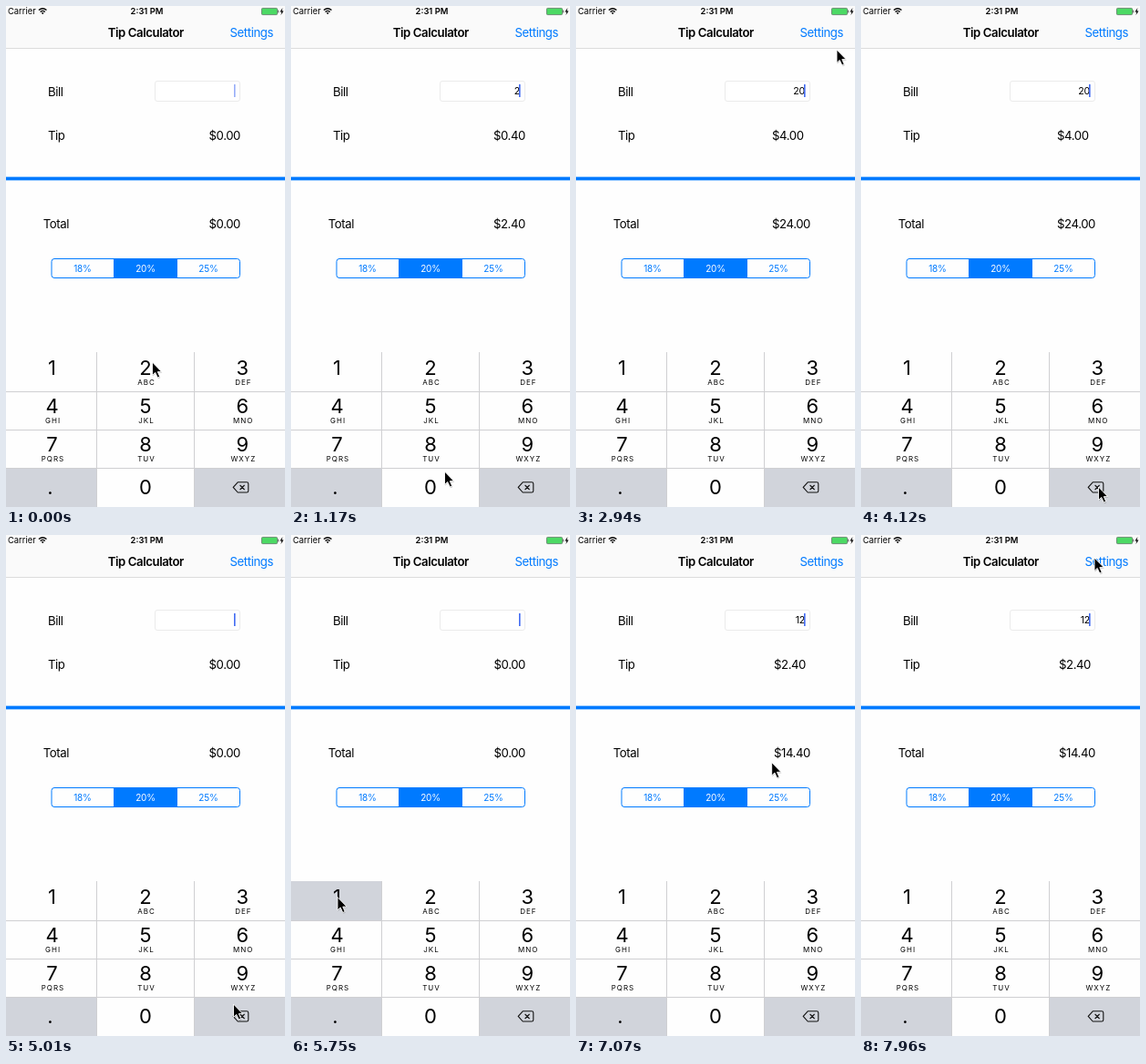
An HTML page for the animation above (8 s loop, 306 by 550 pixels).

```html
<!DOCTYPE html>
<html lang="en">
<head>
<meta charset="utf-8">
<title>Tip Calculator</title>
<style>
  html, body { margin: 0; width: 100%; height: 100%; overflow: hidden; background: #fefefe; }
  svg { display: block; width: 100vw; height: 100vh; }
  text { font-family: Inter, Roboto, sans-serif; fill: #000; white-space: pre; }
  .body { font-size: 13.2px; letter-spacing: -.42px; }
  .bold { font-weight: 600; }
  .link { fill: #007aff; }
  .status { font-size: 9.4px; }
  .seg { font-size: 10px; letter-spacing: -.2px; text-anchor: middle; fill: #007aff; }
  .on { fill: #fff; }
  .field { font-size: 10.6px; letter-spacing: -.3px; }
  .digit { font-size: 22px; text-anchor: middle; }
  .sub { font-size: 8px; letter-spacing: 1px; text-anchor: middle; }
  .mid { text-anchor: middle; }
  .end { text-anchor: end; }
</style>
</head>
<body>
<svg viewBox="0 0 306 550" preserveAspectRatio="none">
  <rect width="306" height="550" fill="#fefefe"/>
  <rect width="306" height="46" fill="#fafafa"/>
  <rect y="46" width="306" height="1" fill="#dcdcdc"/>

  <text class="status" x="2" y="9">Carrier</text>
  <g fill="none" stroke="#000" stroke-width="1.3">
    <path d="M35.9 4.6Q40.2 .9 44.5 4.6M37.6 6.5Q40.2 4.2 42.8 6.5"/>
    <path d="M38.8 7.6Q40.2 6.4 41.6 7.6L40.2 9.2Z" fill="#000" stroke="none"/>
  </g>
  <text class="status bold mid" x="154.5" y="9">2:31 PM</text>
  <rect x="280.4" y="2.4" width="17.2" height="7.2" rx="1.2" fill="#4cd964" stroke="#52665a" stroke-width=".7"/>
  <path d="M298.4 4.6h.5q.7 1.4 0 2.8h-.5z" fill="#333"/>
  <path d="M303.4 2l-3 4.5h1.9l-.8 3.5 3-4.6h-1.9z"/>

  <text class="body bold mid" x="153.3" y="34.3">Tip Calculator</text>
  <text class="body link end" x="293" y="34.3">Settings</text>

  <text class="body" x="46" y="98.6">Bill</text>
  <text class="body" x="46" y="147">Tip</text>
  <text class="body" x="40.8" y="243.8">Total</text>
  <rect x="163.5" y="82.5" width="93" height="22" rx="2.5" fill="#fff" stroke="#ebebeb"/>
  <text class="field end" id="bill" x="250.8" y="97.2"></text>
  <rect id="caret" x="250" y="86" width="1.6" height="14" fill="#426bf2"/>
  <text class="body" id="tip" y="147.4"></text>
  <text class="body end" id="total" x="257" y="243.8"></text>
  <rect y="187.6" width="306" height="3.8" fill="#007aff"/>

  <rect x="50" y="277.5" width="206.5" height="21" rx="3" fill="none" stroke="#007aff"/>
  <rect x="118" y="277" width="70" height="22" fill="#007aff"/>
  <text class="seg" x="84" y="291.8">18%</text>
  <text class="seg on" x="153" y="291.8">20%</text>
  <text class="seg" x="222" y="291.8">25%</text>

  <g id="pad"></g>
  <path d="M254.2 522.8h9.8q1.8 0 1.8 1.8v7.6q0 1.8-1.8 1.8h-9.8l-5-5.6z M256.6 526l5 5m0-5l-5 5"
    fill="none" stroke="#111" stroke-width="1.1" stroke-linejoin="round"/>

  <g id="pointer">
    <path d="M0 0V14.4L3.2 11.4 5.8 17 8.2 16 5.8 10.6H10.2Z" transform="translate(.6 1.2)" opacity=".2"/>
    <path d="M0 0V14.4L3.2 11.4 5.8 17 8.2 16 5.8 10.6H10.2Z" stroke="#fff" stroke-width=".9"/>
  </g>
</svg>
<script>
const $ = id => document.getElementById(id);
const LOOP = 8000, TICK = 147.4, LEAD = 16;
const GREY = '#d1d4db', WHITE = '#fefefe';

function add(parent, tag, attrs, text) {
  const el = document.createElementNS('http://www.w3.org/2000/svg', tag);
  for (const name in attrs) el.setAttribute(name, attrs[name]);
  if (text) el.textContent = text;
  parent.append(el);
  return el;
}

// Keypad
const labels = ['1', '2', '3', '4', '5', '6', '7', '8', '9', '.', '0', 'del'];
const letters = ['', 'ABC', 'DEF', 'GHI', 'JKL', 'MNO', 'PQRS', 'TUV', 'WXYZ'];
const colX = [0, 100, 207, 306], rowY = [380, 424, 466, 508, 550];
const textX = [50.5, 153, 259.3], baseY = [404.8, 446.8, 489, 536];
const keys = {};
labels.forEach((label, i) => {
  const c = i % 3, r = Math.floor(i / 3), idle = label === '.' || label === 'del' ? GREY : WHITE;
  const rect = add($('pad'), 'rect', {
    x: colX[c], y: rowY[r], width: colX[c + 1] - colX[c], height: rowY[r + 1] - rowY[r], fill: idle
  });
  keys[label] = { rect, idle, down: idle === GREY ? WHITE : GREY };
  if (label !== 'del') add($('pad'), 'text', { class: 'digit', x: textX[c] - (c ? 0 : 1) * (label === '.' ? 2 : 0), y: baseY[r] }, label);
  if (letters[i]) add($('pad'), 'text', { class: 'sub', x: textX[c] + 1, y: baseY[r] + 10.8 }, letters[i]);
});
add($('pad'), 'path', { d: 'M99.5 380V550M206.5 380V550M0 423.5H306M0 465.5H306M0 507.5H306', stroke: '#cfcfd2', fill: 'none' });

// Tick, bill, pressed key
const states = [
  [-4, ''], [4, '', '2'], [5, '2'], [11, '2', '0'], [12, '20'],
  [29, '2', 'del'], [30, '2'], [32, '', 'del'], [34, ''],
  [38, '', '1'], [40, '1'], [43, '1', '2'], [45, '12']
];

// Tick, x, y of the pointer
const path = [
  [0, 160.5, 391], [3, 160.5, 391], [5, 161, 395], [6, 164, 430], [8, 168.5, 511],
  [9, 168, 525], [10, 167, 530], [13, 168, 528], [14, 182, 470], [16, 240, 240],
  [17, 296, 28], [18, 292, 36], [20, 286, 48], [21, 270, 95], [23, 228, 300],
  [24, 226, 400], [25, 236, 480], [26, 252, 517], [28, 260.5, 528], [29, 258, 527],
  [33, 258, 527], [34, 249.5, 515], [36, 140, 440], [38, 52, 398], [40, 50, 397],
  [42, 115, 412], [43, 144.5, 405], [45, 147, 409], [46, 152, 417], [49, 246, 166],
  [50, 247, 120], [52, 254, 45], [54, 256, 25]
];

function pointAt(tick) {
  const i = path.findIndex(p => p[0] >= tick);
  const b = path[i < 0 ? path.length - 1 : i], a = path[Math.max(0, i - 1)];
  const k = i > 0 ? (tick - a[0]) / (b[0] - a[0]) : 1;
  return [a[1] + (b[1] - a[1]) * k, a[2] + (b[2] - a[2]) * k];
}

const money = n => '$' + n.toFixed(2);

function draw(tick) {
  const past = states.filter(s => s[0] <= tick);
  const [, bill, pressed] = past[past.length - 1];
  const edited = past.filter((s, i) => !i || s[1] !== past[i - 1][1]).pop()[0];
  const beat = (tick - edited) % 7;

  for (const label in keys) {
    const key = keys[label];
    key.rect.setAttribute('fill', label === pressed ? key.down : key.idle);
  }
  $('bill').textContent = bill;
  $('caret').setAttribute('opacity', beat < 4 ? 1 : beat === 4 ? .55 : 0);
  $('tip').textContent = money(bill * .2);
  $('total').textContent = money(bill * 1.2);
  // The tip lines up with the left edge of the total
  $('tip').setAttribute('x', 257 - $('total').getComputedTextLength());
  $('pointer').setAttribute('transform', `translate(${pointAt(tick)})`);
}

const start = performance.now();
let shown = -1;
function frame() {
  const t = (performance.now() - start) % LOOP;
  const tick = Math.min(54, Math.floor((t + LEAD) / TICK));
  if (tick !== shown) draw(shown = tick);
  requestAnimationFrame(frame);
}
frame();
</script>
</body>
</html>
```
